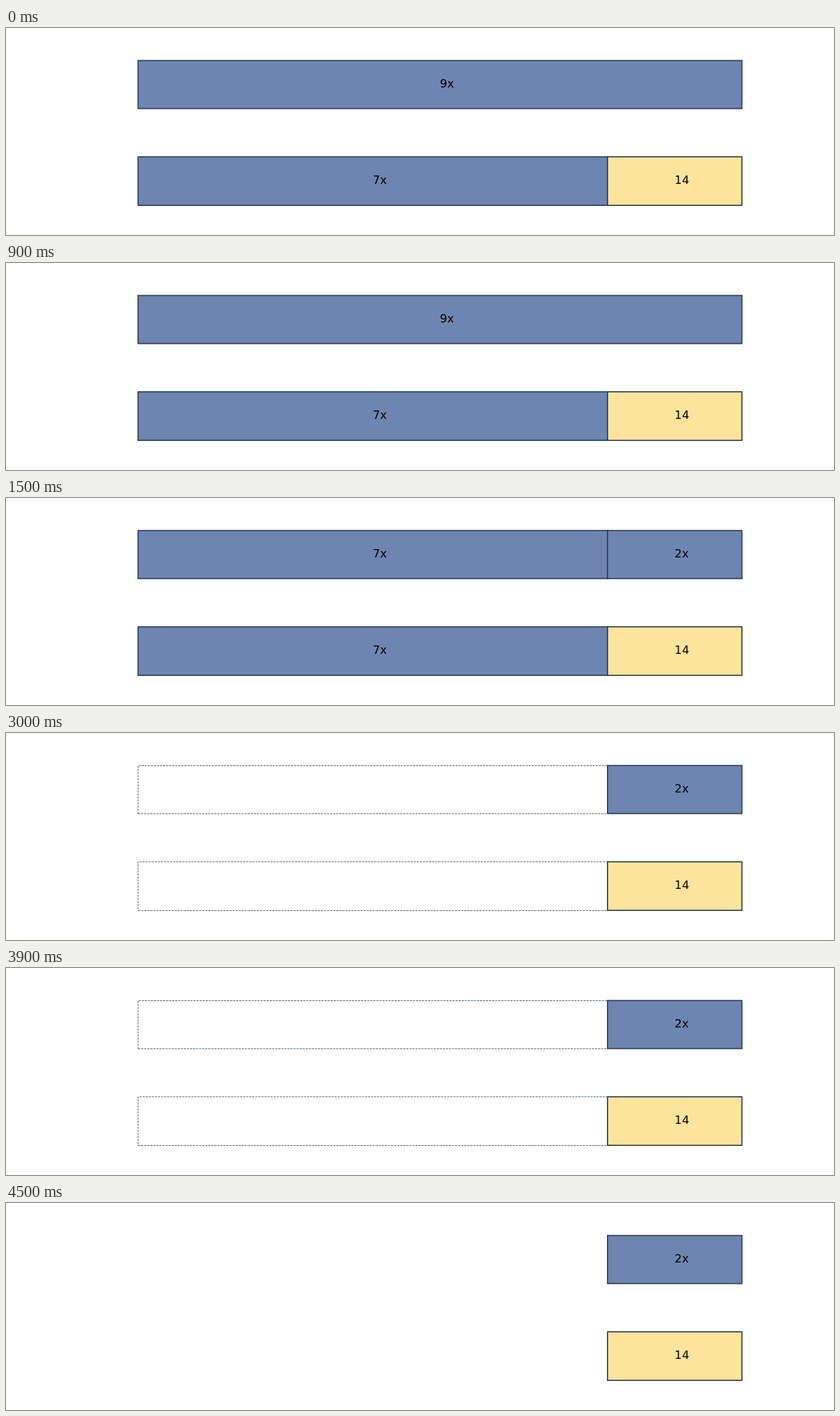
An HTML page for the animation above (6 s loop, 1280 px wide and 320 px high).

```html
<!DOCTYPE html>
<html lang="en">
<head>
<meta charset="utf-8">
<title>Bar model: 9x = 7x + 14</title>
<style>
  html, body { margin: 0; width: 100%; height: 100%; overflow: hidden; background: #fff; }
  svg { display: block; width: 1280px; height: 320px; }
  rect { stroke: #2c3e50; stroke-width: 1.39; }
  text { font: 13.89px "DejaVu Sans", sans-serif; fill: #000; }
  .blue { fill: #6e85b2; }
  .yellow { fill: #fde49c; }
  .ghost path { fill: none; stroke: #2c3e50; stroke-width: .694; stroke-dasharray: 2.57 1.11; }

  .whole, .split, .sevens, .ghost, .rest { animation: 6s step-end infinite; }
  .whole  { animation-name: whole; }
  .split  { animation-name: split; }
  .sevens { animation-name: sevens; }
  .ghost  { animation-name: ghost; }
  .rest   { animation-name: rest; }
  @keyframes whole  { 0% { visibility: visible } 25%, 100% { visibility: hidden } }
  @keyframes split  { 0% { visibility: hidden } 25% { visibility: visible } 50%, 100% { visibility: hidden } }
  @keyframes sevens { 0% { visibility: visible } 50%, 100% { visibility: hidden } }
  @keyframes ghost  { 0% { visibility: hidden } 50% { visibility: visible } 75%, 100% { visibility: hidden } }
  @keyframes rest   { 0% { visibility: hidden } 25%, 100% { visibility: visible } }
</style>
</head>
<body>
<svg viewBox="0 0 1000 250">
  <g class="ghost">
    <path d="M159.5 97.5H726.5V39.5H159.5Z"/>
    <path d="M159.5 214.5H726.5V155.5H159.5Z"/>
  </g>
  <g class="whole">
    <rect class="blue" x="159.5" y="39.3" width="729.3" height="58"/>
    <text x="524" y="72">9x</text>
  </g>
  <g class="split">
    <rect class="blue" x="159.5" y="39.3" width="567" height="58"/>
    <text x="443" y="72">7x</text>
  </g>
  <g class="sevens">
    <rect class="blue" x="159.5" y="155.6" width="567" height="58.6"/>
    <text x="443" y="188.5">7x</text>
  </g>
  <g class="rest">
    <rect class="blue" x="726.5" y="39.3" width="162.3" height="58"/>
    <text x="807.5" y="72">2x</text>
  </g>
  <rect class="yellow" x="726.5" y="155.6" width="162.3" height="58.6"/>
  <text x="807.5" y="188.5">14</text>
</svg>
</body>
</html>
```
